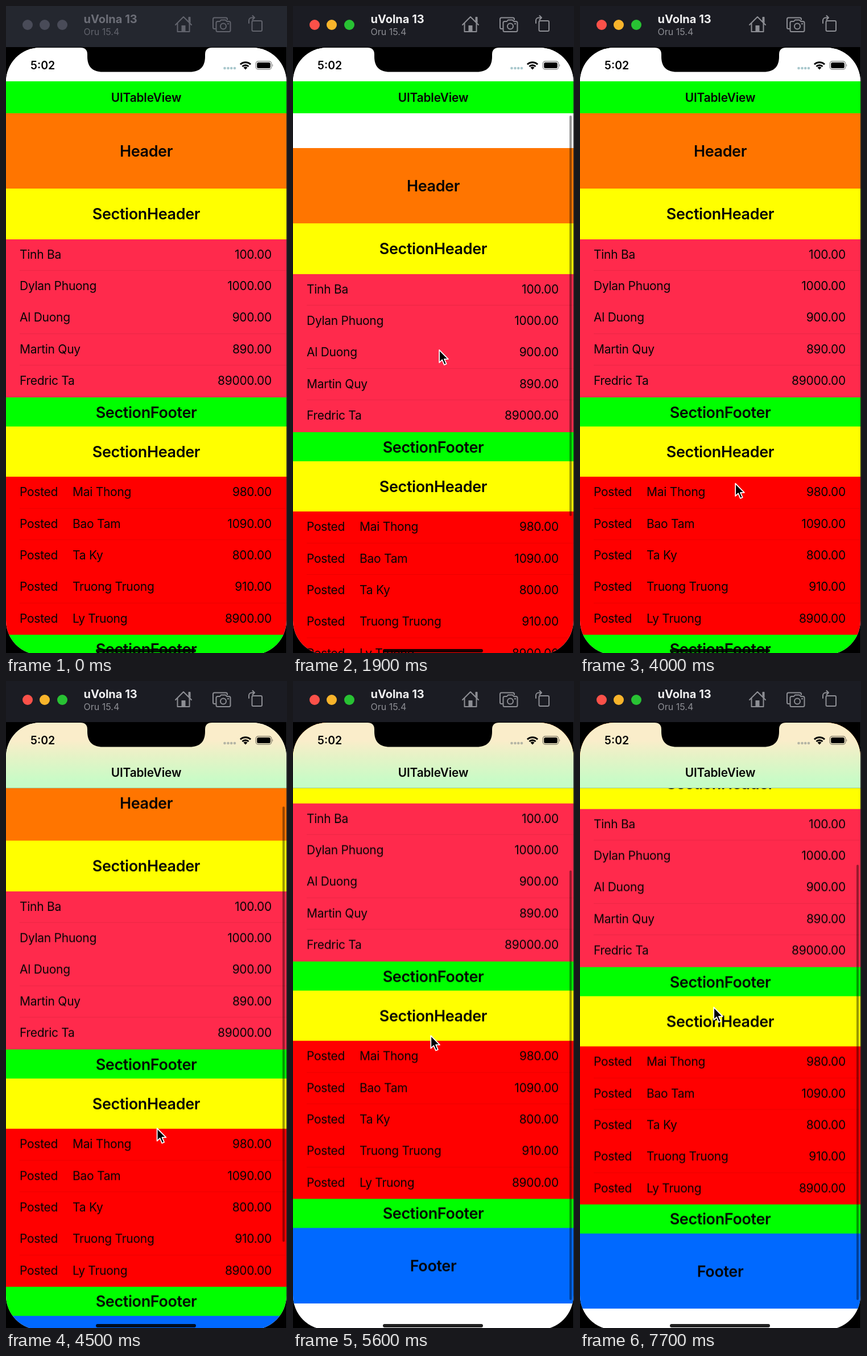
An HTML page that plays this animation: 494 by 1134 pixels, repeating every 7.8 s.

```html
<!DOCTYPE html>
<html lang="en">
<head>
<meta charset="utf-8">
<title>Table view</title>
<style>
  html, body { margin: 0; width: 100%; height: 100%; overflow: hidden; background: #000; }
  body { font-family: Inter, Roboto, "Liberation Sans", sans-serif; color: #050505; }
  div, svg { position: absolute; }
  #stage { left: 0; top: 0; width: 494px; height: 1134px; overflow: hidden; background: #000; }
  #edge { right: 0; top: 72px; width: 1px; height: 1062px; background: #24262c; }

  #bar { left: 0; top: 0; width: 494px; height: 72px; background: #1b1c23; color: #8d8e94; }
  #bar b, #bar span { position: absolute; left: 136.5px; white-space: nowrap; }
  #bar b { top: 11px; font-size: 20px; line-height: 24px; color: #f0f0f1; }
  #bar span { top: 35px; font-size: 16px; line-height: 20px; }
  #bar i { position: absolute; top: 24px; width: 18px; height: 18px; border-radius: 50%; }
  #bar.idle { background: #24272f; color: #61636c; }
  #bar.idle b { color: #6c6e77; }
  #bar.idle i { background: #494b58 !important; }

  #screen { left: 0; top: 73px; width: 493px; height: 1064px; border-radius: 60px; overflow: hidden; background: #fff; }
  #view { left: 0; top: -73px; width: 493px; height: 1139px; }
  #table { left: 0; top: 188px; width: 493px; will-change: transform; }
  .band { left: 0; width: 493px; text-align: center; font-size: 27px; font-weight: 600; letter-spacing: -.014em; }
  .row { left: 0; width: 493px; height: 55.4px; line-height: 53.6px; font-size: 21px; letter-spacing: -.013em; }
  .row span { position: absolute; white-space: nowrap; }
  .row .sum { right: 26px; }
  .row.line::after { content: ""; position: absolute; left: 24px; right: 0; bottom: 0; height: 1px; background: rgba(60, 0, 10, .1); }
  .nav { left: 0; top: 72px; width: 493px; height: 116px; }
  #plain { background: linear-gradient(#fff 60px, #0f0 60px); }
  #glass { background: linear-gradient(#faedca 0 32px, #e4f3c6 62px, #c6fcc6 106px); box-shadow: inset 0 -1px rgba(60, 90, 60, .3); }
  #title { left: 0; top: 132px; width: 493px; line-height: 57px; text-align: center; font-size: 20.8px; font-weight: 600; letter-spacing: -.005em; }
  #clock { left: 43px; top: 92px; font-size: 19.5px; line-height: 24px; font-weight: 600; }
  #thumb { left: 486px; width: 3.6px; border-radius: 2px; background: rgba(0, 0, 0, .4); }
  #home { left: 158px; top: 1127px; width: 176px; height: 6px; border-radius: 3px; background: rgba(0, 0, 0, .88); }
  #art, #pointer { left: 0; top: 0; overflow: visible; }
</style>
</head>
<body>
<div id="stage">
  <div id="edge"></div>
  <div id="screen"><div id="view">
    <div id="table"></div>
    <div class="nav" id="plain"></div>
    <div class="nav" id="glass"></div>
    <div id="title">UITableView</div>
    <div id="clock">5:02</div>
    <div id="thumb"></div>
    <div id="home"></div>
  </div></div>
  <svg id="art" width="494" height="132">
    <path d="M131 73q12 0 12 12v3.500c0 18 9 27 27 27h153c18 0 27-9 27-27v-3.500q0-12 12-12z"/>
    <g id="dots"><circle cx="384.5" cy="109" r="2.3"/><circle cx="390.5" cy="109" r="2.3"/><circle cx="396.2" cy="109" r="2.3"/><circle cx="402" cy="109" r="2.3"/></g>
    <g fill="none" stroke="#000" stroke-width="3">
      <path d="M412 102.3a13 13 0 0 1 18 0M415.5 106a8 8 0 0 1 11 0"/>
    </g>
    <path d="M421 111.5l-3.4-3.6a4.8 4.8 0 0 1 6.8 0z"/>
    <rect x="439.2" y="97" width="27.6" height="14" rx="4.2" fill="none" stroke="#000" stroke-opacity=".45" stroke-width="1.3"/>
    <rect x="441.2" y="99" width="23.6" height="10" rx="2.6"/>
    <path d="M468.3 101.5q2 2.5 0 5z" fill-opacity=".5"/>
  </svg>
  <div id="bar">
    <i style="left:29px;background:#fb5149"></i>
    <i style="left:59px;background:#f8b42b"></i>
    <i style="left:89.5px;background:#28c233"></i>
    <b>uVolna 13</b><span>Oru 15.4</span>
    <svg width="494" height="72" fill="none" stroke="currentColor" stroke-width="2" stroke-linejoin="round" stroke-linecap="round">
      <path d="M298 33l14-14 14 14M301.5 30v15h21v-15M321.5 27v-7h2v9"/>
      <path d="M308.5 44v-10h7v10z" fill="currentColor" stroke="none"/>
      <path d="M368 40h-1.5a2.5 2.5 0 0 1-2.5-2.5v-14.5a2.5 2.5 0 0 1 2.5-2.5h20a2.5 2.5 0 0 1 2.5 2.5v1"/>
      <path d="M372 27h4l2-2.5h8l2 2.5h4a2.5 2.5 0 0 1 2.5 2.5v13a2.5 2.5 0 0 1-2.5 2.5h-20a2.5 2.5 0 0 1-2.5-2.5v-13a2.5 2.5 0 0 1 2.5-2.5z"/>
      <circle cx="382" cy="35.5" r="5"/><circle cx="390.5" cy="31" r=".6"/>
      <rect x="432.5" y="26" width="17.5" height="18" rx="2"/>
      <path d="M427 30v-4.5a5 5 0 0 1 5-5h5M433.5 17l3.5 3.5-3.5 3.5"/>
    </svg>
  </div>
  <svg id="pointer" width="20" height="30">
    <path transform="translate(1.2 1.8) scale(.94)" d="M0 0v23.5l5.3-5 4 9.2 4-1.7-3.9-9h7.3z" stroke="#fff" stroke-width="1.9" stroke-linejoin="round"/>
  </svg>
</div>
<script>
const $ = id => document.getElementById(id);
const LOOP = 7800, STEP = 100, ROW = 55.4;
const END = 184.6;       // furthest resting scroll
const THUMB = 763;       // scroll indicator length

const paid = [["Tinh Ba", "100.00"], ["Dylan Phuong", "1000.00"], ["Al Duong", "900.00"],
  ["Martin Quy", "890.00"], ["Fredric Ta", "89000.00"]];
const posted = [["Mai Thong", "980.00"], ["Bao Tam", "1090.00"], ["Ta Ky", "800.00"],
  ["Truong Truong", "910.00"], ["Ly Truong", "8900.00"]];

let nextTop = 0;
function add(cls, h, color, html) {
  const el = document.createElement("div");
  el.className = cls;
  el.style.cssText = `top:${nextTop}px;height:${h + .3}px;background:${color}`;
  el.innerHTML = html;
  $("table").append(el);
  nextTop += h;
  return el;
}
function band(text, h, color) {
  add("band", h, color, text).style.lineHeight = h + 2 + "px";
}
function rows(list, color, tag) {
  list.forEach(([name, sum], i) => {
    const left = tag ? `<span style="left:24px">${tag}</span><span style="left:117px">${name}</span>`
                     : `<span style="left:24px">${name}</span>`;
    add(i < 4 ? "row line" : "row", ROW, color, `${left}<span class="sum">${sum}</span>`);
  });
}
band("Header", 132, "#ff7500");
band("SectionHeader", 88.6, "#ff0");
rows(paid, "#ff2a4c");
band("SectionFooter", 51, "#0f0");
band("SectionHeader", 88.6, "#ff0");
rows(posted, "#f00", "Posted");
band("SectionFooter", 50.8, "#0f0");
band("Footer", 131.5, "#0069ff");

// pointer stops: time, x, y
const path = [[500, 500, 640], [1000, 244, 483.5], [1200, 244, 483.5], [1300, 244, 492],
  [1900, 256, 601], [2700, 256, 601], [3800, 272, 835], [4100, 272, 835],
  [5100, 253, 703], [5900, 234, 570], [LOOP, 234, 570]];

// drags: press time, release time, pointer y where scrolling begins
const drags = [[1200, 2050, 483.5], [4100, 6125, 822.5]];

const clamp = (v, a, b) => Math.min(b, Math.max(a, v));
const rubber = x => x * .55 / (1 + x * .55 / 1060);

function pointer(t) {
  const i = path.findIndex(p => p[0] > t);
  if (i < 1) return [500, 640];
  const [a, x0, y0] = path[i - 1], [b, x1, y1] = path[i];
  let k = (t - a) / (b - a);
  if (i === 1 || i === 6) k = k * k * (3 - 2 * k);
  return [x0 + (x1 - x0) * k, y0 + (y1 - y0) * k];
}

function dragged(t, start) {
  const raw = start - pointer(t)[1];
  if (raw < 0) return start > 800 ? 0 : -rubber(-raw);
  return raw > END ? END + rubber(raw - END) : raw;
}

function scroll(t) {
  const d = drags.filter(d => d[0] <= t).pop();
  if (!d) return 0;
  const [, release, start] = d;
  if (t < release) return dragged(t, start);
  const from = dragged(release, start), rest = clamp(from, 0, END);
  const w = (t - release) * .012;
  return rest + (from - rest) * (1 + w) * Math.exp(-w);
}

function draw(t) {
  const y = scroll(t), [px, py] = pointer(t);
  const rest = clamp(y, 0, END), over = Math.abs(y - rest);
  $("bar").className = t < 1000 ? "idle" : "";
  $("table").style.transform = `translateY(${-y.toFixed(2)}px)`;

  const glass = clamp(y / 16, 0, 1);
  $("plain").style.opacity = glass < 1 ? 1 : 0;
  $("glass").style.opacity = glass;
  $("dots").setAttribute("fill", glass > .5 ? "#b4b5a5" : "#a9c8cd");

  const thumb = $("thumb").style;
  thumb.top = 191.5 + rest * .709 + (y > END ? over : 0) + "px";
  thumb.height = THUMB - over + "px";
  thumb.opacity = t < 1200 ? 0 : t < 4200 ? clamp((3200 - t) / 300, 0, 1) : 1;

  $("pointer").style.transform = `translate(${px}px,${py}px)`;
  $("pointer").style.visibility = t < 500 ? "hidden" : "visible";
}

const began = performance.now();
function tick() {
  const t = (performance.now() - began) % LOOP;
  draw(Math.floor(t / STEP) * STEP);
  requestAnimationFrame(tick);
}
tick();
</script>
</body>
</html>
```
